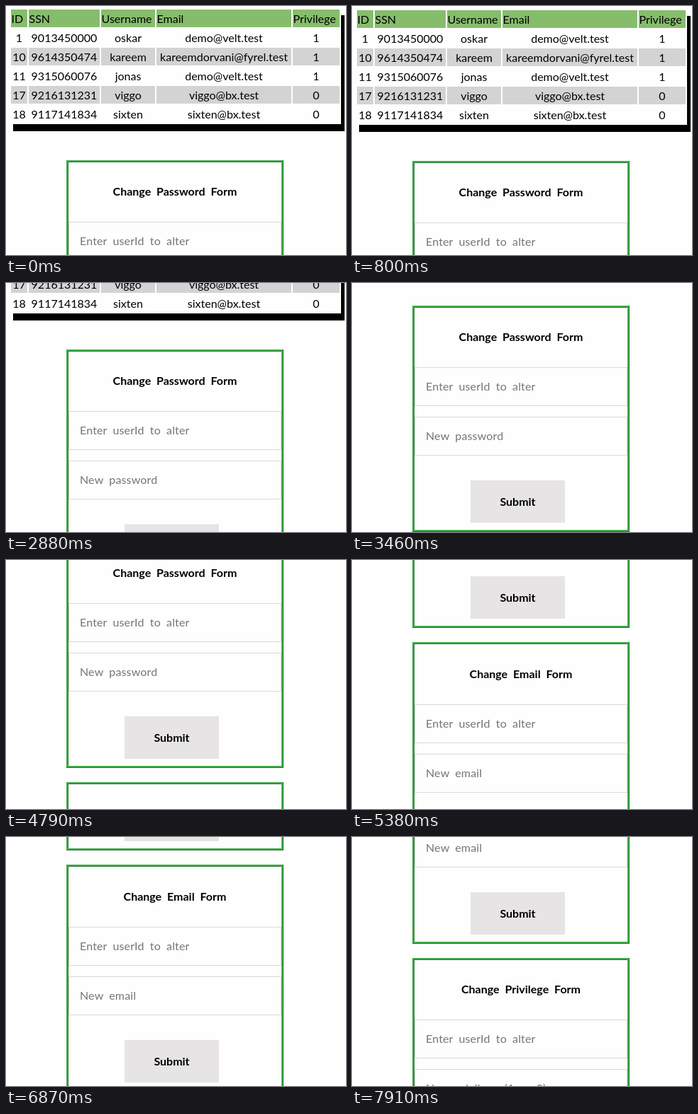
Recreate the animation shown at these times as an HTML page. Size 479 px wide and 352 px high, loop 8000 ms.

```html
<!DOCTYPE html>
<html lang="en">
<head>
<meta charset="utf-8">
<title>User admin</title>
<style>
  html, body { margin: 0; width: 100%; height: 100%; overflow: hidden; background: #fefefe; }
  svg { display: block; }
  text { font: 16px Lato, "Open Sans", sans-serif; fill: #000; }
  .mid { text-anchor: middle; }
  .bold { font-weight: 700; word-spacing: 4px; }
  .hint { fill: #757575; word-spacing: 4px; letter-spacing: .15px; }
</style>
</head>
<body>
<svg width="479" height="352" viewBox="0 0 479 352"><g id="page"></g></svg>
<script>
const LOOP = 8000;
const page = document.getElementById('page');

function add(tag, attrs, label) {
  const el = document.createElementNS('http://www.w3.org/2000/svg', tag);
  for (const key in attrs) el.setAttribute(key, attrs[key]);
  if (label) el.textContent = label;
  page.appendChild(el);
}
const box = (x, y, width, height, fill) => add('rect', { x, y, width, height, fill });
const text = (x, y, label, cls = '') => add('text', { x, y, class: cls }, label);
const line = (d, stroke) => add('path', { d, stroke, fill: 'none' });

// Columns: left edge, width, heading
const columns = [
  [7, 23, 'ID'], [32, 100, 'SSN'], [134, 76, 'Username'], [212, 190, 'Email'], [404, 66, 'Privilege']
];
const users = [
  ['1', '9013450000', 'oskar', 'demo@velt.test', '1'],
  ['10', '9614350474', 'kareem', 'kareemdorvani@fyrel.test', '1'],
  ['11', '9315060076', 'jonas', 'demo@velt.test', '1'],
  ['17', '9216131231', 'viggo', 'viggo@bx.test', '0'],
  ['18', '9117141834', 'sixten', 'sixten@bx.test', '0']
];

function drawTable() {
  box(10, 13, 467, 164, '#000');
  box(5, 3, 467, 164, '#fefefe');
  columns.forEach(([x, width, title], c) => {
    box(x, 5, width, 25, '#86bd6c');
    text(x + 0.5, 24, title);
    users.forEach((user, r) => {
      const y = 32 + r * 27;
      if (r % 2) box(x, y, width, 25, '#d3d3d3');
      text(x + width / 2, y + 19, user[c], 'mid');
    });
  });
}

function drawInput(y, hint) {
  add('rect', { x: 88.5, y: y + 0.5, width: 299, height: 54, fill: 'none', stroke: '#d9d9d9' });
  text(104, y + 33, hint, 'hint');
}

// "nudge" shifts the content for the form whose height rounds up
function drawForm(top, title, hint, nudge = 0) {
  const height = 320 + nudge, end = top + height, y = top + nudge;
  add('rect', { x: 86.5, y: top + 1.5, width: 303, height: height - 3,
    fill: 'none', stroke: '#43ad4d', 'stroke-width': 3 });
  line(`M87.5 ${end - 3}V${top + 2.5}H388`, '#1f7528');
  line(`M85 ${end - 0.5}H390.5V${top}`, '#1f7528');
  text(238, y + 50, title, 'mid bold');
  drawInput(y + 87, 'Enter userId to alter');
  drawInput(y + 157, hint);
  box(167, y + 247, 133, 60, '#e6e4e5');
  text(233.5, y + 283, 'Submit', 'mid bold');
}

drawTable();
drawForm(218, 'Change Password Form', 'New password');
drawForm(558, 'Change Email Form', 'New email', 1);
drawForm(899, 'Change Privilege Form', 'New privilege (1 or 0)');

// Scroll gestures: start time, step length, positions reached
const gestures = [
  [0, 0, [0]],
  [500, 150, [2, 1, -1]],
  [1100, 145, [-2, -1, 0]],
  [2440, 146, [22, 53, 92, 124, 148, 165, 177, 186, 192, 196, 199, 201]],
  [4790, 148.3, [244, 305, 362, 408, 442, 467, 485, 498, 509, 517, 520, 522, 523]],
  [6870, 0, [519]],
  [7470, 146.7, [570, 640, 693, 728]]
];
// Steps land on hundredths of a second
const stops = gestures.flatMap(([start, step, list]) =>
  list.map((y, i) => ({ at: start + Math.round(i * step / 10) * 10, y })));

function scrollAt(t) {
  let y = 0;
  for (const stop of stops) if (stop.at <= t) y = stop.y;
  return y;
}

const begin = performance.now();
function render() {
  const t = (performance.now() - begin) % LOOP;
  page.setAttribute('transform', `translate(0 ${-scrollAt(t)})`);
  requestAnimationFrame(render);
}
render();
</script>
</body>
</html>
```
